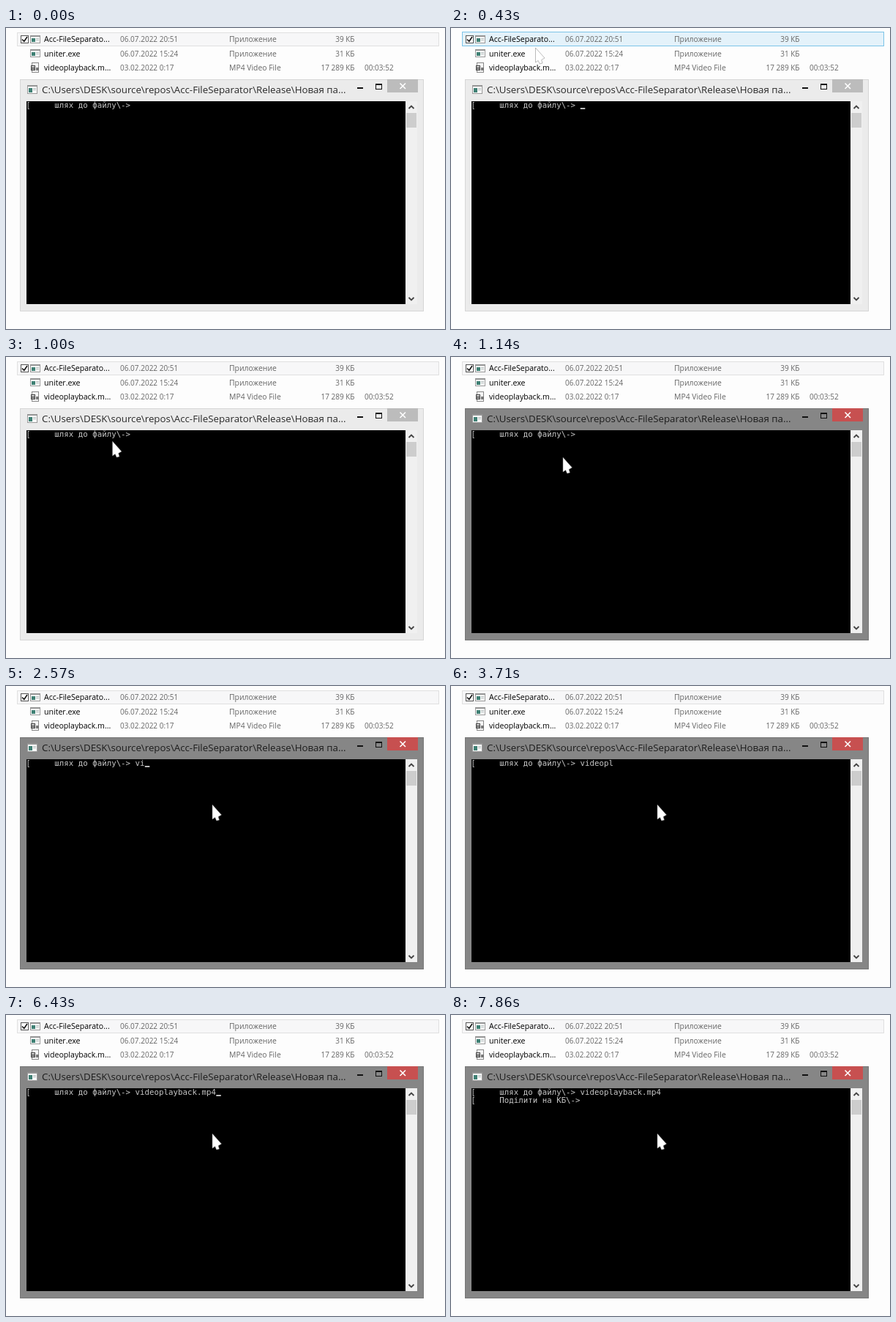
An HTML page with a canvas that plays this animation: 600 px wide and 411 px high, repeating every 8 s.

```html
<!DOCTYPE html>
<html lang="uk">
<head>
<meta charset="utf-8">
<style>
html, body { margin: 0; width: 100%; height: 100%; overflow: hidden; background: #fdfdfd; }
canvas { display: block; }
</style>
</head>
<body>
<canvas width="600" height="411"></canvas>
<script>
const ctx = document.querySelector('canvas').getContext('2d');
const LOOP = 8000, FPS = 7;
const UI = '"Open Sans", "Noto Sans", sans-serif';
const MONO = '"DejaVu Sans Mono", "Liberation Mono", monospace';
const CELL = 6.5;

const FILE = 'videoplayback.mp4';
const KEYS = [15, 18, 20, 22, 24, 25, 26, 28, 30, 31, 32, 33, 35, 39, 41, 42, 44]; // step of each keystroke
const ENTER = 46, FOCUS = 8;

const ROWS = [
  { y: 15.5, name: 'Acc-FileSeparato...', date: '06.07.2022 20:51', type: 'Приложение', size: '39 КБ' },
  { y: 35, name: 'uniter.exe', date: '06.07.2022 15:24', type: 'Приложение', size: '31 КБ' },
  { y: 54.5, name: 'videoplayback.m...', date: '03.02.2022 0:17', type: 'MP4 Video File', size: '17 289 КБ', length: '00:03:52' }
];

function rect(x, y, w, h, fill, stroke) {
  ctx.fillStyle = fill;
  ctx.fillRect(x, y, w, h);
  if (stroke) {
    ctx.strokeStyle = stroke;
    ctx.lineWidth = 1;
    ctx.strokeRect(x + .5, y + .5, w - 1, h - 1);
  }
}

function text(s, x, y, size, color, font = UI, align = 'left') {
  ctx.font = `${size}px ${font}`;
  ctx.fillStyle = color;
  ctx.textAlign = align;
  ctx.fillText(s, x, y);
}

function line(points, color, width) {
  ctx.beginPath();
  points.forEach(([x, y]) => ctx.lineTo(x, y));
  ctx.strokeStyle = color;
  ctx.lineWidth = width;
  ctx.stroke();
}

function exeIcon(x, y, h) {
  rect(x, y, 14, h, '#fafafa', '#9a9a9a');
  rect(x, y, 14, 2, '#959595');
  rect(x + 2, y + 4, 5, h - 6, '#3f8074');
  rect(x + 8, y + 4, 4, 1, '#b5bebe');
  rect(x + 8, y + 6, 4, 1, '#b5bebe');
}

function videoIcon(x, y) {
  rect(x + 1, y, 10, 14, '#f6f6f6', '#888');
  rect(x, y + 4, 6, 7, '#444');
  rect(x + 1, y + 5, 4, 2, '#ccc');
  rect(x + 1, y + 8, 4, 2, '#999');
  rect(x + 7, y + 7, 4, 4, '#777');
}

function drawRow(row, i, hover) {
  const { y } = row;
  if (hover) rect(15, Math.floor(y - 10), 577, 20, '#e4f2fa', '#7cc4e8');
  else if (i === 0) rect(15, 6, 577, 19, '#f7f7f8', '#e0e0e0');
  if (hover || i === 0) rect(20, Math.round(y - 5.5), 11, 11, '#fff', '#555');
  if (i === 0) line([[22, 15.5], [24.8, 18.3], [29, 12]], '#111', 1.6);
  if (i < 2) exeIcon(33, Math.round(y - 6), 11);
  else videoIcon(34, 47);
  const base = y + 3.9, gray = '#666';
  text(row.name, 52, base, 10.6, '#000');
  text(row.date, 156, base, 10, gray);
  text(row.type, 305, base, 10.4, gray);
  text(row.size, 476.5, base, 10, gray, UI, 'right');
  if (row.length) text(row.length, 490, base, 10, gray);
}

function drawWindow(active) {
  const frame = active ? '#868686' : '#ebebeb';
  rect(19, 70, 552, 317, frame, active ? '#767676' : '#d6d6d6');
  exeIcon(29, 78, 12);
  text('C:\\Users\\DESK\\source\\repos\\Acc-FileSeparator\\Release\\Новая па...', 49, 89.3, 13.3, active ? '#1c1c1c' : '#2a2a2a');
  rect(480, 81, 8, 2, '#111');
  rect(505, 76, 9, 8, frame, '#111');
  rect(505, 76, 9, 2, '#111');
  rect(521, 70, 42, 18, active ? '#c75050' : '#bcbcbc');
  line([[538.5, 75.5], [546, 83]], '#fff', 1.6);
  line([[546, 75.5], [538.5, 83]], '#fff', 1.6);

  rect(28, 100, 518, 277, '#000');
  rect(546, 100, 16, 277, '#f0f0f0');
  rect(547, 116, 14, 20, '#cdcdcd');
  line([[550.5, 110], [554, 106.5], [557.5, 110]], '#444', 1.8);
  line([[550.5, 368], [554, 371.5], [557.5, 368]], '#444', 1.8);
}

function drawConsole(step) {
  const put = (s, row) => text(s, 27.3, 108.8 + row * 11, CELL / .602, '#c6c6c6', MONO);
  const typed = FILE.slice(0, KEYS.filter(k => k <= step).length);
  const lines = ['[     шлях до файлу\\-> ' + typed];
  if (step >= ENTER) lines.push('[     Поділити на КБ\\-> ');
  ctx.save();
  ctx.beginPath();
  ctx.rect(28, 100, 518, 277);
  ctx.clip();
  lines.forEach(put);
  ctx.restore();
  const phase = step % FPS, last = lines.length - 1;
  if (phase >= 2 && phase <= 4) rect(27.3 + lines[last].length * CELL, 109 + last * 11, CELL, 1.8, '#d0d0d0');
}

function pointerAt(step) {
  if (step <= 8) return [153 + (step - 8) * 7.5, 137 + (step - 8) * 22];
  const left = (1 - Math.min(1, (step - 8) / 7)) ** 2;
  return [282 - 129 * left, 162 - 25 * left];
}

function drawPointer([x, y]) {
  ctx.save();
  ctx.translate(x, y);
  ctx.beginPath();
  [[0, 0], [0, 20], [3.7, 17.5], [5.7, 22], [9.5, 21], [8.2, 16.5], [12.5, 14]].forEach(([a, b]) => ctx.lineTo(a, b));
  ctx.closePath();
  ctx.fillStyle = '#fff';
  ctx.fill();
  ctx.strokeStyle = '#777';
  ctx.lineWidth = .5;
  ctx.stroke();
  ctx.restore();
}

function draw(now) {
  // The screen refreshes in steps of 1/7 s
  const step = Math.floor((now % LOOP + 5) * FPS / 1000) % (LOOP / 1000 * FPS);
  const hovered = { 3: 0, 4: 1, 5: 2, 6: 2 }[step];
  rect(0, 0, 600, 411, '#fdfdfd');
  ROWS.forEach((row, i) => drawRow(row, i, i === hovered));
  drawWindow(step >= FOCUS);
  drawConsole(step);
  if (step > 2) drawPointer(pointerAt(step));
}

let start;
function tick(now) {
  start ??= now;
  draw(now - start);
  requestAnimationFrame(tick);
}
requestAnimationFrame(tick);
</script>
</body>
</html>
```
